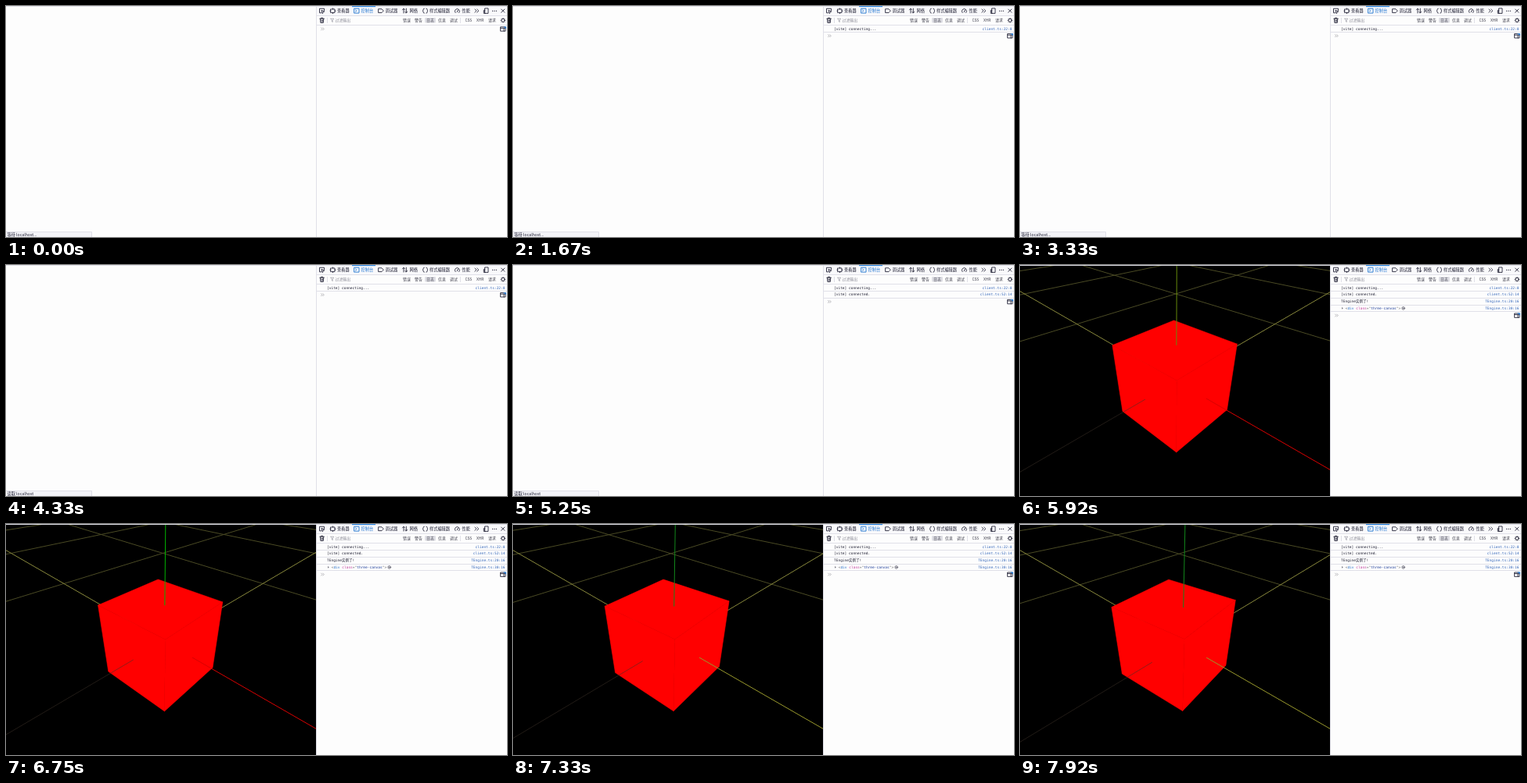
An HTML page with a canvas that plays this animation: 640 px wide and 296 px high, repeating every 8000 ms.

```html
<!DOCTYPE html>
<html lang="zh-CN">
<head>
<meta charset="utf-8">
<title>Console</title>
<style>
  html, body { margin: 0; width: 100%; height: 100%; overflow: hidden; background: #fdfdfd; }
  canvas, svg { position: absolute; left: 0; top: 0; }
  text { font: 500 5.2px 'Noto Sans CJK SC', 'Noto Sans', sans-serif; fill: #1c1c30; white-space: pre; }
  .small text { font-size: 4.9px; fill: #3c3c4a; }
  .mono text { font: 4.5px 'DejaVu Sans Mono', 'Noto Sans CJK SC', monospace; }
  .mono .link { fill: #2f62b8; text-anchor: end; }
  .icon { fill: none; stroke: #26263a; stroke-width: .9; stroke-linecap: round; stroke-linejoin: round; }
  .rule { fill: none; stroke: #e0e0e8; stroke-width: 1; }
</style>
</head>
<body>
<canvas id="view" width="396" height="296"></canvas>
<svg width="640" height="296" viewBox="0 0 640 296">
  <path class="rule" d="M0 .5H640"/>
  <g id="status">
    <rect x="0" y="289" width="110" height="7" fill="#f4f4f8"/>
    <path class="rule" d="M0 289.5H109.5V296"/>
    <text id="statusText" x="1.5" y="294.6"></text>
  </g>
  <rect x="396" y="0" width="244" height="296" fill="#fdfdfd"/>
  <rect x="397" y="1" width="243" height="11" fill="#f9f9fb"/>
  <path class="rule" d="M396.5 0V296M397 .5H640M397 12.5H640M397 24.5H640"/>
  <rect x="442" y="0" width="30" height="1.2" fill="#2f86e0"/>

  <g id="tabs"></g>
  <g class="icon">
    <path d="M403 8.8h-2.5v-5.5h6v2.3M403.3 5.6l3.6 1.4-1.6.7-.7 1.6z"/>
    <path d="M415 4h5v4.6h-5zM414 6.3h1M420 6.3h1M417.5 3v1M417.5 8.6v1"/>
    <path stroke="#1f74d0" style="stroke:#1f74d0" d="M445 3.3h6v5.8h-6zM446.5 5l1.3 1.2-1.3 1.2"/>
    <path d="M476 3.8h4l2.3 2.4-2.3 2.4h-4z"/>
    <path d="M508 9V3.3l-1.5 1.6M508 3.3l1.4 1.6M511.3 3.2V9l-1.4-1.6M511.3 9l1.5-1.6"/>
    <path d="M534.3 3.2q-1.2 0-1.2 1.4t-.9 1.6q.9.2.9 1.6t1.2 1.4M536.9 3.2q1.2 0 1.2 1.4t.9 1.6q-.9.2-.9 1.6t-1.2 1.4"/>
    <path d="M574 8.5a3 3 0 1 1 4.8 0M576.3 7.8l1-2.4"/>
    <path d="M599 4.2l2 2-2 2M601.8 4.2l2 2-2 2"/>
    <path d="M612 3h4v6.4h-4zM610.3 6h1.7M610.3 6v3.4h2"/>
    <path style="stroke-width:1.3" d="M621.6 6.3h.1M624 6.3h.1M626.4 6.3h.1"/>
    <path d="M632.7 4.1l4.2 4.2M636.9 4.1l-4.2 4.2"/>
    <path d="M400.8 16.2h5.6M401.5 16.5l.4 5h3.4l.4-5M402.6 16v-.8h2V16M403 18v2M404.3 18v2"/>
    <path style="stroke:#8c8c98;stroke-width:.6" d="M414.8 16.2h4l-1.5 2v2.4l-1-.6v-1.8z"/>
    <circle cx="635" cy="18.4" r="2"/>
    <path d="M635 15.5v.5M635 20.8v.5M632.1 18.4h.5M637.4 18.4h.5M633 16.4l.3.3M636.7 20.1l.3.3M637 16.4l-.3.3M633.3 20.1l-.3.3"/>
  </g>
  <path class="rule" d="M410.5 15V22M580.5 15V22"/>
  <rect x="535" y="15" width="14" height="6.5" rx="1" fill="#e0e0e6"/>
  <g id="filters" class="small"></g>

  <g id="rows" class="mono"></g>
  <g id="prompt">
    <path d="M402.3 -1.8l1.8 1.8-1.8 1.8M404.5 -1.8l1.8 1.8-1.8 1.8" fill="none" stroke="#a8a8ac" stroke-width=".8"/>
    <path class="icon" d="M632 -2.6h6v5.4h-6zM632 -1h6M636 -1v3.8"/>
    <path d="M635.6 -2.4h2.8v2" fill="none" stroke="#2f86e0" stroke-width="1.2"/>
  </g>
</svg>
<script>
const LOOP = 8000, SCENE_AT = 5500;
const $ = id => document.getElementById(id);
const NS = 'http://www.w3.org/2000/svg';

function add(parent, tag, attrs, text) {
  const el = document.createElementNS(NS, tag);
  for (const k in attrs) el.setAttribute(k, attrs[k]);
  if (text) el.textContent = text;
  return parent.appendChild(el);
}

[['查看器', 423], ['控制台', 453.5], ['调试器', 484.5], ['网络', 515.5], ['样式编辑器', 541], ['性能', 582.5]]
  .forEach(([s, x], i) => add($('tabs'), 'text', { x, y: 8.2, style: i === 1 ? 'fill:#1f74d0' : '' }, s));

[['过滤输出', 420.5], ['错误', 507], ['警告', 522], ['日志', 537], ['信息', 552], ['调试', 567],
 ['CSS', 586.5], ['XHR', 601], ['请求', 616]]
  .forEach(([s, x], i) => add($('filters'), 'text', { x, y: 20.2, style: i ? '' : 'fill:#8c8c98' }, s));

// Console log: time of arrival, message, place
const ROW = 8.8;
const logs = [
  [1670, '[vite] connecting...', 'client.ts:22:8'],
  [5000, '[vite] connected.', 'client.ts:52:14'],
  [SCENE_AT, 'TEngine实例了!', 'TEngine.ts:20:16'],
  [SCENE_AT, '', 'TEngine.ts:30:16']
];
const rows = logs.map(([at, msg, place], i) => {
  const g = add($('rows'), 'g', {}), mid = 29 + i * ROW;
  if (msg) add(g, 'text', { x: 410, y: mid + 1.5 }, msg);
  else addNode(g, mid);
  add(g, 'text', { x: 637.5, y: mid + 1.5, class: 'link' }, place);
  add(g, 'path', { class: 'rule', d: `M397 ${Math.floor(mid + 4.4) + .5}H640` });
  return g;
});

function addNode(g, mid) {
  add(g, 'path', { d: `M411 ${mid - 1.3}l1.8 1.3-1.8 1.3z`, fill: '#777782' });
  const t = add(g, 'text', { x: 415.7, y: mid + 1.5 });
  [['<', '#666'], ['div', '#2a70c8'], [' class', '#c03a9a'], ['="', '#666'],
   ['three-canvas', '#20409a'], ['">', '#666']]
    .forEach(([s, c]) => add(t, 'tspan', { style: 'fill:' + c }, s));
  add(g, 'circle', { cx: 489.7, cy: mid, r: 1.8, class: 'icon', style: 'stroke-width:.6' });
  add(g, 'circle', { cx: 489.7, cy: mid, r: .6, fill: '#26263a' });
}

// 3D scene; the camera sits at distance 1 along (1,1,1)
const ctx = $('view').getContext('2d');
const CX = 198, CY = 148, FOCAL = 333.4, HALF = .154, STEP = .774;

function project([x, y, z]) {
  const k = FOCAL / (1 - (x + y + z) / Math.sqrt(3));
  return [CX + k * (x - z) / Math.SQRT2, CY - k * (2 * y - x - z) / Math.sqrt(6)];
}

function line(a, b, color) {
  ctx.strokeStyle = color;
  ctx.beginPath();
  ctx.moveTo(...project(a));
  ctx.lineTo(...project(b));
  ctx.stroke();
}

function face(points) {
  ctx.beginPath();
  points.forEach(p => ctx.lineTo(...project(p)));
  ctx.closePath();
  ctx.fill();
  ctx.stroke();
}

const turns = [[5500, 0], [5920, .022], [6750, .056], [7920, .122], [8000, .1266]];
function turnAt(t) {
  const i = Math.max(1, turns.findIndex(p => p[0] >= t));
  const [t0, a] = turns[i - 1], [t1, b] = turns[i];
  return a + (b - a) * (t - t0) / (t1 - t0);
}

function drawScene(t) {
  const turn = turnAt(t), shift = turn * .33;
  const sin = Math.sin(turn), cos = Math.cos(turn);
  const center = '#88883c', grid = '#4a4a24', far = -6 * STEP;

  ctx.fillStyle = '#000';
  ctx.fillRect(0, 0, 396, 296);
  ctx.lineWidth = 1;
  for (let k = 1; k <= 5; k++) {
    line([far, 0, -k * STEP], [1.4, 0, -k * STEP], grid);
    line([shift - k * STEP, 0, far], [shift - k * STEP, 0, 1.4], grid);
  }
  line([far, 0, 0], [0, 0, 0], center);
  line([shift, 0, far], [shift, 0, 0], center);

  ctx.fillStyle = ctx.strokeStyle = '#f00';
  ctx.lineWidth = .6;
  const corner = (x, y, z) => [HALF * (x * cos + z * sin), HALF * y, HALF * (z * cos - x * sin)];
  const ring = [[-1, -1], [1, -1], [1, 1], [-1, 1]];
  face(ring.map(([a, b]) => corner(a, 1, b)));
  face(ring.map(([a, b]) => corner(1, a, b)));
  face(ring.map(([a, b]) => corner(a, b, 1)));

  // axes leave the box through its faces
  ctx.lineWidth = 1;
  const up = t < 6330 ? '#668a0c' : t < 7170 ? '#00b400' : '#12881c';
  line([shift, HALF, 0], [shift, 1.2, 0], up);
  line([HALF / cos, 0, 0], [1.2, 0, 0], t < 7170 ? '#d80000' : '#98982c');
  line([shift, 0, (HALF - shift * sin) / cos], [shift, 0, 1.2], 'rgba(60,50,40,.55)');
}

function show(el, on) { el.style.display = on ? '' : 'none'; }

function render(t) {
  const scene = t >= SCENE_AT;
  let count = 0;
  logs.forEach(([at], i) => {
    show(rows[i], t >= at);
    if (t >= at) count++;
  });
  $('prompt').setAttribute('transform', `translate(0 ${29.4 + count * ROW})`);
  show($('status'), !scene);
  $('statusText').textContent = t < 4170 ? '等待 localhost...' : '读取 localhost';
  show($('view'), scene);
  if (scene) drawScene(t);
}

const start = performance.now();
function tick() {
  render((performance.now() - start) % LOOP);
  requestAnimationFrame(tick);
}
tick();
</script>
</body>
</html>
```
